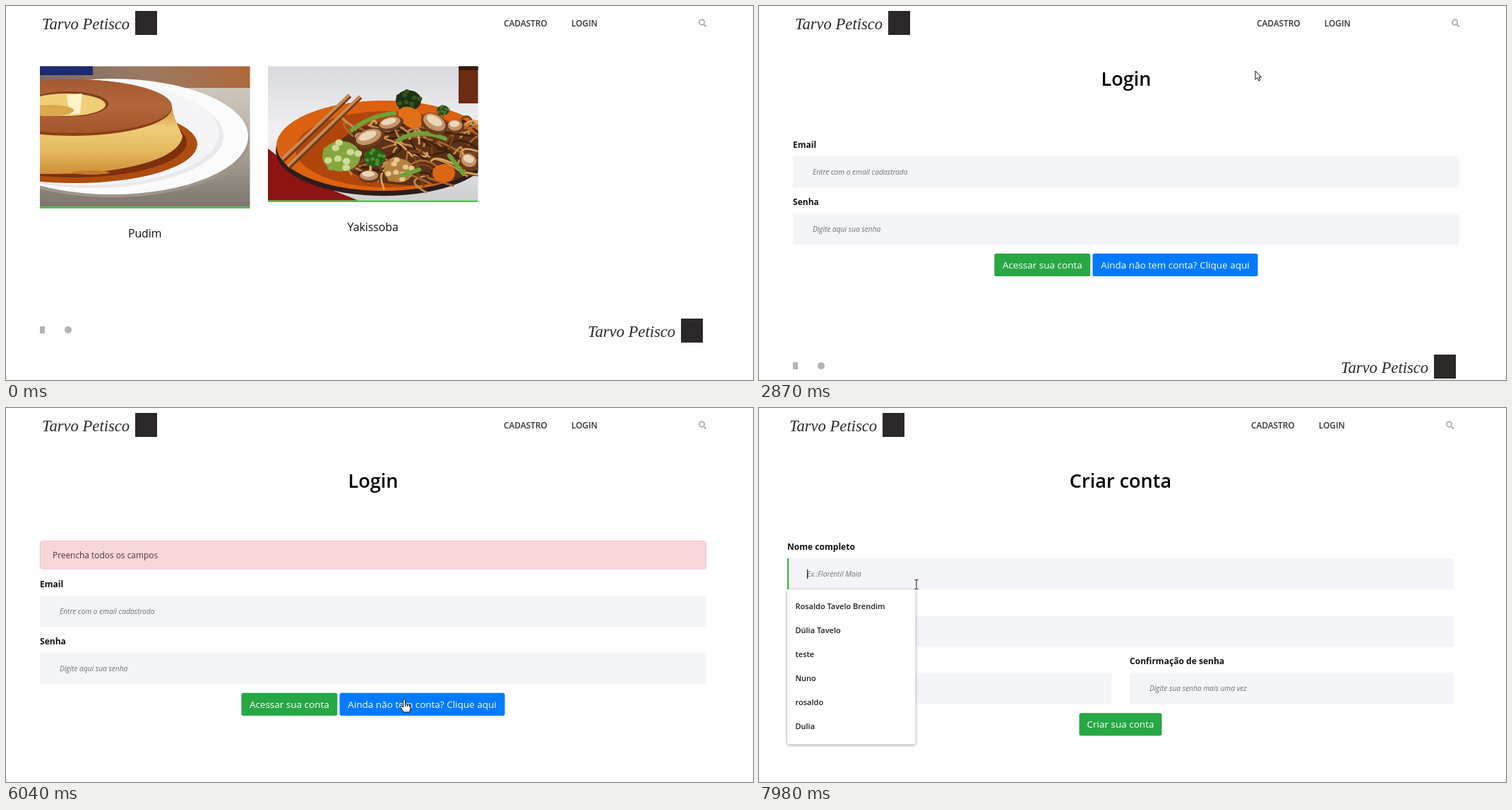
These frames come from a looping animation (1058x530 px, 8 s). An HTML page:

```html
<!DOCTYPE html>
<html lang="pt-BR">
<head>
<meta charset="utf-8">
<title>Receitas</title>
<style>
html, body { margin: 0; width: 100%; height: 100%; overflow: hidden; background: #fefefe; }
svg { display: block; font-family: "Open Sans", sans-serif; fill: #111; }
.nav { font-weight: 600; font-size: 11.85px; fill: #333; text-anchor: middle; }
.logo { font: italic 22.6px "Liberation Serif", serif; fill: #2c2828; }
.title { font-weight: 600; font-size: 27.1px; fill: #000; text-anchor: middle; }
.dish { font-size: 15.8px; text-anchor: middle; }
.label { font-weight: 700; font-size: 12.05px; }
.hint { font-style: italic; font-size: 10.2px; fill: #6c757d; }
.btn { font-size: 13.5px; fill: #fff; text-anchor: middle; }
.alert { font-size: 11.9px; fill: #5b3036; }
.item { font-weight: 600; font-size: 11px; fill: #1c1c1c; }
.cursor { fill: #fff; stroke: #111; stroke-width: 1; stroke-linejoin: round; }
</style>
</head>
<body>
<svg id="stage" width="1058" height="530" viewBox="0 0 1058 530"></svg>
<script>
const text = (x, y, cls, s) => `<text x="${x}" y="${y}" class="${cls}">${s}</text>`;
const rect = (x, y, w, h, fill, more = '') =>
  `<rect x="${x}" y="${y}" width="${w}" height="${h}" fill="${fill}" ${more}/>`;
const oval = (x, y, rx, ry, fill, more = '') =>
  `<ellipse cx="${x}" cy="${y}" rx="${rx}" ry="${ry}" fill="${fill}" ${more}/>`;
const path = (d, fill, more = '') => `<path d="${d}" fill="${fill}" ${more}/>`;
const group = (id, body, more = '') => `<g id="${id}" ${more}>${body}</g>`;
const gradient = (id, dir, ...colors) => `<linearGradient id="${id}" ${dir}>` +
  colors.map((c, i) => `<stop offset="${i / (colors.length - 1)}" stop-color="${c}"/>`).join('') +
  '</linearGradient>';
const down = 'x1="0" y1="0" x2="0" y2="1"';

let seed = 7;
const random = () => (seed = seed * 16807 % 2147483647) / 2147483647;
const between = (a, b) => a + random() * (b - a);

const logo = (x, y) => text(x, y + 25.5, 'logo', 'Tarvo Petisco') + rect(x + 132, y, 31, 34, '#2c2828');

const header = logo(51, 7) + text(735.8, 29.4, 'nav', 'CADASTRO') + text(819.3, 29.4, 'nav', 'LOGIN') +
  path('M988.5 26.5 991.6 29.4', 'none', 'stroke="#aaa" stroke-width="2"') +
  oval(985.5, 23, 3.7, 3.7, 'none', 'stroke="#aaa" stroke-width="1.7"');

const footer = y => rect(48, y + 11, 7, 10, '#b4b4b4') + oval(88, y + 16, 5, 5, '#b4b4b4') + logo(824, y);

const field = (x, y, w, label, hint) => text(x, y - 12, 'label', label) +
  rect(x, y, w, 44, '#f3f5f8') + text(x + 28, y + 25.6, 'hint', hint);

const button = (x, y, w, label, fill, id) =>
  rect(x, y, w, 32.3, fill, `rx="3.2" id="${id}"`) + text(x + w / 2, y + 21, 'btn', label);

function pudding() {
  return rect(48, 85, 298, 200, 'url(#table)') + rect(48, 85, 298, 31, 'url(#shelf)') +
    rect(48, 85, 75, 13, '#1d2a70') +
    oval(150, 191, 195, 80, '#9d968d') + oval(150, 185, 193, 82, '#fbfbfb') +
    oval(122, 184, 186, 74, '#e9eaee') + oval(118, 180, 184, 74, '#f5f5f7') +
    oval(98, 196, 173, 55, '#ad4d12') + oval(98, 193, 158, 50, '#7d300a') +
    path('M40 140 235 143Q238 160 250 184C247 216 170 240 48 238Z', 'url(#flan)') +
    oval(95, 144, 140, 40, '#8c3f16') + oval(95, 142, 140, 38, 'url(#caramel)') +
    oval(88, 139, 57, 18, '#86401a') + oval(85, 140, 56, 16, '#f0cf78') +
    path('M86 126 108 124 105 152 90 154Z', '#fff3c8') + oval(62, 148, 34, 8, '#dca94c') +
    oval(120, 236, 26, 3, '#c37a2b');
}

function noodles() {
  const browns = ['#c58a4b', '#7a421a', '#a8672f', '#3f200e', '#d9a465'];
  let strands = '';
  for (let i = 0; i < 75; i++) {
    const x = between(490, 665), y = between(165, 246);
    strands += path(`M${x} ${y}q${between(-45, 45)} ${between(-38, 10)} ${between(-20, 60)} ${between(-10, 26)}`,
      'none', `stroke="${browns[i % 5]}" stroke-width="2.8"`);
  }
  const floret = (x, y, r, fill, light) => {
    let s = oval(x, y, r, r * .8, fill);
    for (let i = 0; i < 16; i++) {
      const a = i * 2.4, d = r * Math.sqrt(i / 16);
      s += oval(x + d * Math.cos(a), y + d * .75 * Math.sin(a), r * .2, r * .17, i % 2 ? light : fill);
    }
    return s;
  };
  const meat = (x, y, rx, ry, turn) => {
    const spin = `transform="rotate(${turn} ${x} ${y})"`;
    return oval(x, y + 1, rx, ry, '#6b3a1c', spin) + oval(x - 1, y - 1, rx * .85, ry * .78, '#c1946a', spin) +
      oval(x - 2, y - 3, rx * .6, ry * .45, '#ecd6b8', spin);
  };
  return rect(371, 85, 298, 190, 'url(#cloth)') + rect(641, 85, 28, 53, '#6c2b13') +
    rect(641, 85, 28, 6, '#3c170c') + path('M371 202Q390 215 405 238L500 276H371Z', '#8c1413') +
    oval(535, 205, 153, 64, '#2b1d1c') + oval(535, 198, 152, 64, '#dc6110') +
    oval(540, 203, 130, 54, '#b1460c') + oval(575, 207, 108, 47, '#5a3018') + strands +
    floret(475, 213, 27, '#86a63f', '#cddb96') + floret(570, 134, 18, '#1c3312', '#37531f') +
    floret(522, 215, 15, '#276019', '#4a8f2e') + floret(619, 148, 9, '#30501d', '#587a35') +
    floret(556, 233, 21, '#b3813f', '#e5c78f') +
    path('M556 190Q585 172 622 188M490 176Q515 155 550 152M585 232 560 240M628 212 648 238', 'none',
      'stroke="#6da236" stroke-width="6" stroke-linecap="round"') +
    oval(573, 158, 19, 13, '#e0701a', 'transform="rotate(35 573 158)"') + oval(620, 237, 16, 13, '#dd6613') +
    meat(515, 186, 22, 13, -20) + meat(607, 166, 20, 14, 30) + meat(545, 166, 18, 10, -15) +
    meat(515, 241, 15, 9, 0) + meat(656, 220, 13, 12, 20) + meat(637, 170, 12, 10, 0) +
    path('M487 127 392 219M502 129 400 229', 'none', 'stroke="#6e3a1a" stroke-width="6.5"') +
    path('M486 126 391 217M501 128 399 227', 'none', 'stroke="#c98a55" stroke-width="4"');
}

const card = (id, x, h, art, name) =>
  `<clipPath id="${id}"><rect x="${x}" y="85.5" width="297.5" height="${h}"/></clipPath>` +
  `<g clip-path="url(#${id})">${art}</g>` + rect(x, 85.5 + h, 297.5, 2.2, '#3ab53a') +
  text(x + 148.7, 128.5 + h, 'dish', name);

const home = card('c1', 48, 199, pudding(), 'Pudim') + card('c2', 371, 190, noodles(), 'Yakissoba') +
  group('hover', rect(785, 9, 68, 30, '#4cbb46') + rect(785, 37, 68, 2.4, '#278f2a') +
    text(819.3, 29.4, 'nav', '<tspan fill="#fff">LOGIN</tspan>')) + footer(443);

const login = text(520, 112.5, 'title', 'Login') +
  group('alert', rect(48.5, 188.5, 943, 39.5, '#f8d7da', 'rx="3" stroke="#f3c3c9"') +
    text(66, 212.5, 'alert', 'Preencha todos os campos')) +
  group('form', field(48, 213, 943.5, 'Email', 'Entre com o email cadastrado') +
    field(48, 294.3, 943.5, 'Senha', 'Digite aqui sua senha') +
    button(333.3, 350.8, 136, 'Acessar sua conta', '#28a745', 'enter') +
    button(472.5, 350.8, 234, 'Ainda não tem conta? Clique aqui', '#007bff', 'join') + footer(494));

const names = ['Rosaldo Tavelo Brendim', 'Dúlia Tavelo', 'teste', 'Nuno', 'rosaldo', 'Dulia'];
const signup = text(520, 112.5, 'title', 'Criar conta') +
  field(48, 213, 944, 'Nome completo', 'Ex.:Florentil Maia') +
  field(48, 294.3, 944, 'Email', 'Ex.: florentil@panelin.test') +
  field(48, 375.3, 459.5, 'Senha', 'Digite sua senha') +
  field(533, 375.3, 459, 'Confirmação de senha', 'Digite sua senha mais uma vez') +
  button(461.5, 432.2, 117, 'Criar sua conta', '#28a745', 'create') +
  group('focus', rect(48, 213, 2.2, 44, '#3ab53a') + rect(76, 228.5, 1.2, 13.5, '#223')) +
  group('names', rect(48, 257, 181.5, 219.5, '#fff',
      'rx="3" style="filter:drop-shadow(0 1px 2px rgba(0,0,0,.4))"') +
    names.map((n, i) => text(59.5, 285 + 34 * i, 'item', n)).join(''));

const pizza = path('M-1-11A11.5 11.5 0 1 0 11 1H-1ZM2-13V-2H13A11 11 0 0 0 2-13ZM-1-8A8.5 8.5 0 0 0-9 1M-9 1A8.5 8.5 0 0 0 8 1M4.5-10A8 8 0 0 1 10-4.5M-12 1H-1V12',
  'none', 'stroke="#35b03f" stroke-width="1.3"') +
  [[-5, -3], [-4, 6], [4, 5], [5, -6]].map(([x, y]) =>
    oval(x, y, 1.7, 1.7, 'none', 'stroke="#35b03f"')).join('');
const loader = rect(0, 0, 1058, 530, '#fefefe') + group('spinner',
  oval(0, 0, 25, 25, '#fefefe', 'stroke="#b7bab7" stroke-width="1.4"') + pizza +
  path('M-17.7-17.7A25 25 0 0 1 17.7-17.7', 'none', 'id="arc" stroke="#0f8a1f" stroke-width="2.2"'));

const cursors = {
  arrow: path('M0 0V12.2L2.8 9.6 4.8 14 6.8 13.1 4.9 8.8H8.6Z', '#fff'),
  hand: path('M-1.5 1Q0-1 1.5 1V7L3 6.3 4.5 7.4 6 7 7.4 8.2 9 8.6V12.5L7.5 18H-1L-5 11Q-5 8.5-3 9.5L-1.5 11.3ZM1.5 7V10M4.5 7.6V10.3M7.4 8.4V10.6', '#fff'),
  beam: path('M-2.5-6.5H-.6L0-6 .6-6.5H2.5M0-6V6M-2.5 6.5H-.6L0 6 .6 6.5H2.5', 'none')
};

document.getElementById('stage').innerHTML = '<defs>' +
  gradient('table', down, '#d6d0c8', '#c4bcb2', '#a39b91', '#7c756c') +
  gradient('shelf', '', '#7d6a66', '#9a7a62', '#b0683a') +
  gradient('caramel', down, '#a45a33', '#b3663a', '#a4552a') +
  gradient('flan', down, '#c98a3a', '#efcd7a', '#e5b95f', '#cf8f38') +
  gradient('cloth', down, '#d8dadd', '#f1f1f3', '#cfcfd1') + '</defs>' +
  group('page', header + group('home', home) + group('login', login) + group('signup', signup)) +
  group('loader', loader) +
  group('cursor', Object.entries(cursors).map(([id, art]) => group(id, art)).join(''), 'class="cursor"');

const $ = id => document.getElementById(id);
const show = (id, on) => $(id).style.display = on ? '' : 'none';
const within = (t, a, b) => t >= a && t < b;

// [time, x, y] of the pointer's hot spot
const route = [[380, 964, 447], [760, 828, 147], [1160, 828, 147], [1600, 797, 22], [2150, 797, 22],
  [2700, 703, 92], [2870, 703, 92], [3180, 612, 312], [3480, 612, 312], [4020, 560, 362],
  [4340, 560, 362], [4660, 430, 374], [5500, 430, 374], [5950, 564, 413], [7050, 564, 413],
  [7400, 235, 262], [7700, 223, 250], [8000, 223, 250]];
// [loader shown, fade begins]
const loads = [[2070, 2180], [4970, 5300], [6590, 6605]];

function pointer(t) {
  const i = Math.max(1, route.findIndex(k => k[0] > t));
  const [a, x, y] = route[i - 1], [b, x2, y2] = route[i];
  const p = Math.max(0, (t - a) / (b - a)), e = p * p * (3 - 2 * p);
  return [x + (x2 - x) * e, y + (y2 - y) * e];
}

function cursorKind(t) {
  if (within(t, 1480, 2070) || within(t, 3850, 4970) || within(t, 5900, 7130)) return 'hand';
  return within(t, 3110, 3700) || t > 7380 ? 'beam' : 'arrow';
}

function draw(t) {
  const stage = loads.filter(l => t >= l[0]).length;
  const shift = stage === 3 ? -8 : 0;
  $('page').setAttribute('transform', `translate(${shift})`);
  show('home', stage === 0);
  show('login', stage === 1 || stage === 2);
  show('signup', stage === 3);
  show('hover', t >= 1480);
  show('alert', stage === 2);
  $('form').setAttribute('transform', `translate(0 ${stage === 2 ? 53 : 0})`);
  $('enter').setAttribute('fill', within(t, 4520, 4970) ? '#218838' : '#28a745');
  $('join').setAttribute('fill', within(t, 3850, 4480) || within(t, 6080, 6590) ? '#0069d9' : '#007bff');
  show('focus', t >= 7600);
  show('names', t >= 7820);

  show('loader', stage > 0);
  if (stage) {
    const [start, fade] = loads[stage - 1];
    const p = Math.min(1, Math.max(0, (t - fade) / 600));
    $('loader').setAttribute('opacity', .5 + .5 * Math.cos(Math.PI * p));
    $('spinner').setAttribute('transform', `translate(${520 + shift} 276.8)`);
    $('arc').setAttribute('transform', `rotate(${(t - start) * .6})`);
  }

  show('cursor', t >= 380);
  $('cursor').setAttribute('transform', `translate(${pointer(t)})`);
  for (const kind in cursors) show(kind, kind === cursorKind(t));
}

function tick() {
  draw(performance.now() % 8000);
  requestAnimationFrame(tick);
}
tick();
</script>
</body>
</html>
```
